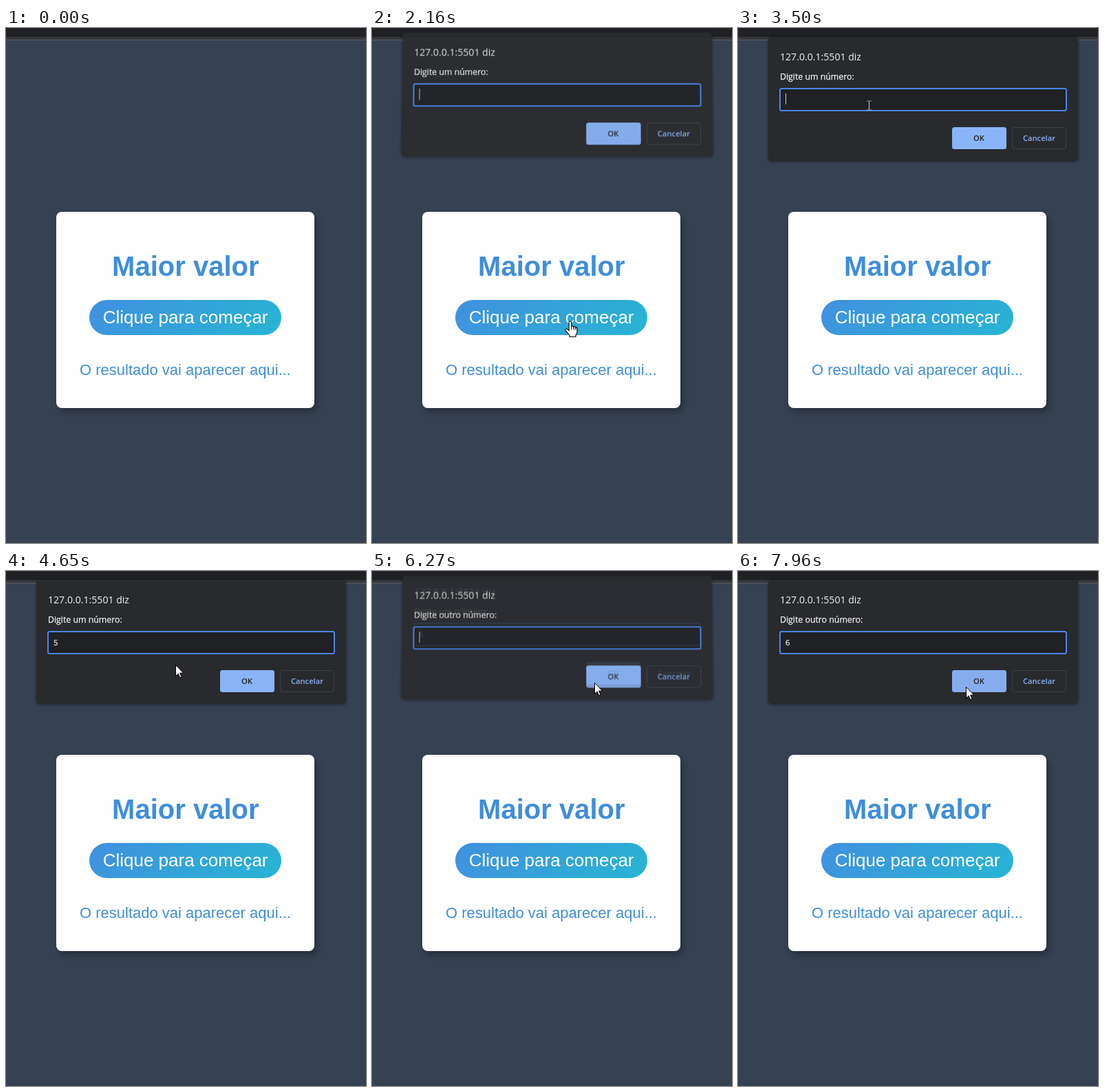
Recreate the animation shown at these times as an HTML page. Size 523 by 748 pixels, loop 7990 ms.

```html
<!DOCTYPE html>
<html lang="pt-BR">
<head>
<meta charset="utf-8">
<title>Maior valor</title>
<style>
  html, body { margin: 0; width: 100%; height: 100%; overflow: hidden; background: #364152; }
  #stage { position: relative; width: 523px; height: 748px; overflow: hidden; background: #364152; }
  #bar { position: absolute; width: 523px; height: 13px; background: #202124; border-bottom: 4px solid #36373b; }
  #bar::after { content: ""; position: absolute; top: 17px; width: 100%; height: 1px; background: #5b5d66; }
  #card { position: absolute; left: 73px; top: 267px; width: 375px; height: 285px;
    background: #fefefe; border-radius: 8px; box-shadow: 4px 6px 10px rgba(0, 0, 0, .27); }
  #start { position: absolute; left: 121px; top: 395px; width: 279px; height: 51px;
    border-radius: 26px; background: linear-gradient(135deg, #4190df, #27b5d3); }
  svg { position: absolute; left: 0; top: 0; overflow: visible; }
  .page { font-family: "Liberation Sans", Arial, sans-serif; text-anchor: middle; fill: #3f8edb; }
  .dialog { position: absolute; left: 44px; top: 13px; width: 450px; height: 180px;
    background: #292a2d; border-radius: 5px; box-shadow: 0 1px 4px rgba(0, 0, 0, .45); }
  .dialog text { font-family: "Open Sans", "Noto Sans", sans-serif; fill: #f1f2f4; }
  .dialog .small { stroke: #f1f2f4; stroke-width: .25px; }
  .dialog .label { font-size: 11.2px; font-weight: 600; text-anchor: middle; }
</style>
</head>
<body>
<div id="stage">
  <div id="bar"></div>
  <div id="card"></div>
  <div id="start"></div>
  <svg class="page" width="523" height="748">
    <text x="260.8" y="360" font-size="40" font-weight="700">Maior valor</text>
    <text x="260.6" y="429" font-size="26" fill="#fff">Clique para começar</text>
    <text x="260.5" y="504" font-size="22">O resultado vai aparecer aqui...</text>
  </svg>
  <div id="dialogs"></div>
  <svg id="cursor" width="523" height="748">
    <path id="arrow" fill="#fff" stroke="#000"
      d="M.5 .5V16.6L4.2 13.2 6.6 18.8 9 17.8 6.6 12.2H11.7Z"/>
    <g id="hand" stroke="#000" stroke-width="1.1" stroke-linecap="round" stroke-linejoin="round">
      <path fill="#fff" d="M-1.8 13.5V1.8Q-1.8 0 0 0T1.8 1.8V8Q1.9 6.6 3.4 6.7T5 8.6Q5.2 7.3 6.5 7.5T7.8 9.3Q8.2 8.3 9.2 8.7T10 10.5V15Q10 18 8 20V22.5H-1V20.5L-6.6 13.6Q-7.6 12-6.4 11.2T-3.8 11.8Z"/>
      <path fill="none" d="M1.8 8V11.5M5 8.6V11.8M7.8 9.3V12"/>
    </g>
    <path id="beam" fill="none" stroke="#d4d4d4" d="M-3-6.5H-.8M.8-6.5H3M0-6V6M-3 6.5H-.8M.8 6.5H3"/>
  </svg>
</div>
<script>
const LOOP = 7990, OPEN_MS = 250, CLOSE_MS = 190, HOVER_MS = 200, BLINK_MS = 530;
const $ = id => document.getElementById(id);
const clamp = v => Math.min(1, Math.max(0, v));
const within = (v, a, b) => v >= a && v < b;
const show = (el, on) => { el.style.display = on ? "" : "none"; };

// Each stroke of the pointer eases out towards x, y; bend bows its path sideways.
const entry = { x: 472, y: 742 };
const moves = [
  { start: 310, end: 1880, x: 284, y: 414, bend: 8 },
  { start: 2060, end: 2150, x: 288, y: 426, bend: 0 },
  { start: 2200, end: 3140, x: 190, y: 112, bend: 100 },
  { start: 4290, end: 5550, x: 323, y: 162, bend: 6 },
  { start: 6330, end: 6800, x: 246, y: 104, bend: 0 },
  { start: 7280, end: 7960, x: 331, y: 168, bend: 12 }
];

const prompts = [
  { text: "Digite um número:", value: "5", open: 2060, typed: 3760, hover: 5350, close: 6130 },
  { text: "Digite outro número:", value: "6", open: 6170, typed: 7070, hover: 7740, close: Infinity }
];

function build(p) {
  const el = document.createElement("div");
  el.className = "dialog";
  el.innerHTML = `<svg width="450" height="180" viewBox="44 13 450 180">
    <text x="61" y="47" font-size="14.08">127.0.0.1:5501 diz</text>
    <text class="small" x="61" y="75" font-size="12.34">${p.text}</text>
    <rect x="61" y="88" width="416" height="32" rx="2.5" fill="#202124" stroke="#4a84ec" stroke-width="2"/>
    <text class="small value" x="69" y="108" font-size="11.4">${p.value}</text>
    <rect class="caret" y="95" width="1" height="16" fill="#c8cacd"/>
    <rect class="ok" x="311" y="144" width="79" height="32" rx="3.5"/>
    <text class="label" x="350" y="164" style="fill:#202124">OK</text>
    <rect x="398.5" y="144.5" width="78" height="31" rx="3.5" fill="none" stroke="#3f4246"/>
    <text class="label" x="437.5" y="164" style="fill:#8ab4f8">Cancelar</text>
  </svg>`;
  p.el = el;
  for (const part of ["value", "caret", "ok"]) p[part] = el.querySelector("." + part);
  return el;
}
// The closing dialog stays above the opening one.
$("dialogs").append(...prompts.map(build).reverse());

function drawPrompt(p, t) {
  const opening = clamp((t - p.open) / OPEN_MS);
  const closing = clamp((t - p.close) / CLOSE_MS);
  const visible = opening > 0 && closing < 1;
  show(p.el, visible);
  if (!visible) return;

  const tilt = (1 - opening) ** 2 + closing * .84;
  p.el.style.opacity = (1 - (1 - opening) ** 5) * (1 - closing) ** 1.6;
  p.el.style.transform = tilt
    ? `perspective(1000px) translateY(${-19 * tilt}px) rotateX(${8 * tilt}deg) scale(${1 + .006 * tilt})` : "none";

  // Typing restarts the caret's blink.
  const typed = t >= p.typed;
  const blink = Math.floor((t - (typed ? p.typed : p.open + 100)) / BLINK_MS);
  show(p.value, typed);
  show(p.caret, t < p.hover && (blink < 0 || blink % 2 === 0));
  p.caret.setAttribute("x", typed ? 76 : 69);

  const h = clamp((t - p.hover) / HOVER_MS);
  p.ok.setAttribute("fill", `rgb(${138 - 3 * h}, ${180 - 8 * h}, ${248 - 10 * h})`);
}

function follow(from, move, t) {
  const u = 1 - (1 - clamp((t - move.start) / (move.end - move.start))) ** 1.65;
  const dx = move.x - from.x, dy = move.y - from.y;
  const bow = 2 * u * (1 - u) * move.bend / Math.hypot(dx, dy);
  return [from.x + dx * u - dy * bow, from.y + dy * u + dx * bow];
}

function drawCursor(t) {
  const i = moves.findLastIndex(m => t >= m.start);
  const hidden = i < 0 || prompts.some(p => within(p.typed, moves[i].start, t));
  show($("cursor"), !hidden);
  if (hidden) return;

  const [x, y] = follow(moves[i - 1] || entry, moves[i], t).map(Math.round);
  const inInput = t > prompts[0].open && within(x, 60, 478) && within(y, 87, 121);
  const inButton = within(x, 121, 400) && within(y, 395, 446);
  const shape = inInput ? "beam" : inButton ? "hand" : "arrow";
  for (const id of ["arrow", "hand", "beam"]) show($(id), id === shape);
  const half = inInput ? .5 : 0;
  $(shape).setAttribute("transform", `translate(${x + half} ${y + half})`);
}

function frame() {
  const t = performance.now() % LOOP;
  prompts.forEach(p => drawPrompt(p, t));
  drawCursor(t);
  requestAnimationFrame(frame);
}
frame();
</script>
</body>
</html>
```
